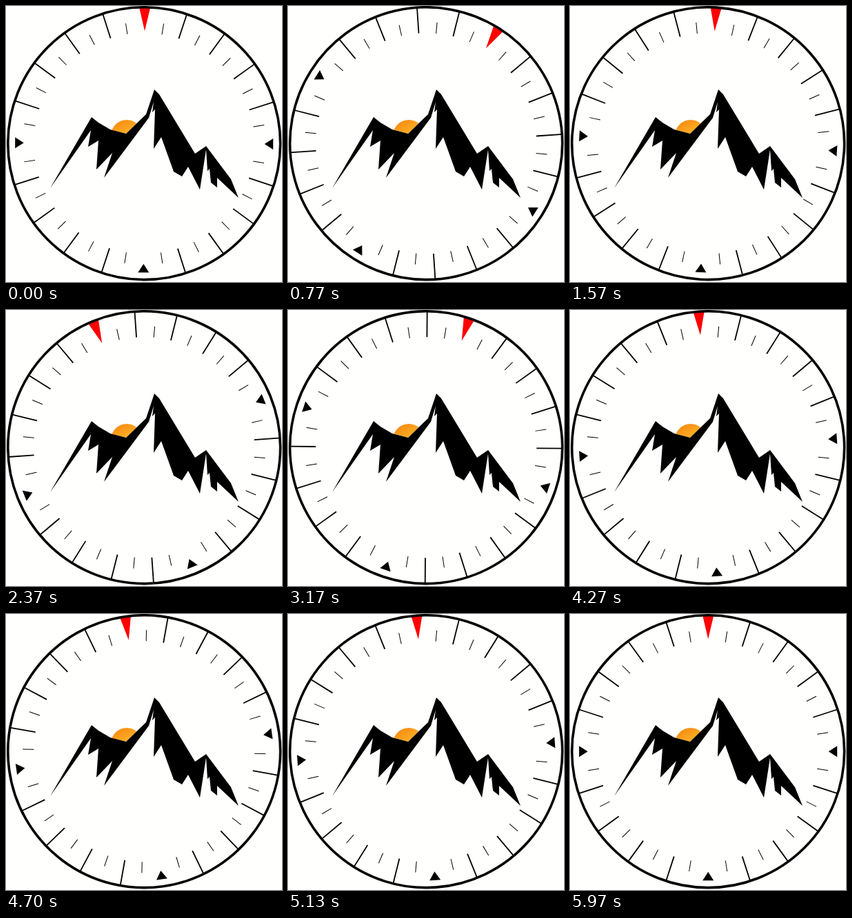
An HTML page with a canvas for the animation above (6.01 s loop, 400 by 400 pixels).

```html
<!DOCTYPE html>
<html lang="en">
<head>
<meta charset="utf-8">
<title>Mountain compass</title>
<style>
html, body { margin: 0; width: 100%; height: 100%; overflow: hidden; background: #fffffd; }
canvas { display: block; width: 400px; height: 400px; }
</style>
</head>
<body>
<canvas id="stage" width="400" height="400"></canvas>
<script>
const ctx = document.getElementById('stage').getContext('2d');
const LOOP = 6010, SWING = 6000, STEP = 100 / 3, LAST = 179;
const INK = '#000', PAPER = '#fffffd';

// Evenly spaced turning points of the needle, in degrees
const swings = [0, 35, -22, 22, -8, 0];

// Key points: the skyline from left to right, then the shaded side back again
const skyline = [
  [64, 264], [124, 161], [134, 169], [151, 179], [174, 185], [203, 157],
  [215, 121], [222, 128], [274, 214], [290, 203], [326, 251], [337, 278]
];
const shade = [
  [306, 249], [306, 263], [297, 256], [295, 236], [292, 239], [290, 208],
  [281, 266], [264, 233], [255, 247], [243, 240], [225, 190], [214, 207],
  [216, 150], [212, 154], [214, 139], [207, 162], [142, 249], [154, 213],
  [131, 237], [134, 195], [119, 204], [123, 180]
];

// cubic-bezier(.25, .1, .25, 1)
function ease(x) {
  let lo = 0, hi = 1;
  for (let i = 0; i < 24; i++) {
    const s = (lo + hi) / 2;
    if (0.75 * s * (1 - s) + s * s * s < x) lo = s; else hi = s;
  }
  const s = (lo + hi) / 2, r = 1 - s;
  return 0.3 * r * r * s + 3 * r * s * s + s * s * s;
}

function angleAt(ms) {
  const n = Math.min(LAST, Math.floor((ms + 5) / STEP));
  const p = Math.min((n * STEP + 20) / SWING, 0.9999) * (swings.length - 1);
  const i = Math.floor(p);
  return swings[i] + (swings[i + 1] - swings[i]) * ease(p - i);
}

function trace(points) {
  ctx.beginPath();
  points.forEach(([x, y]) => ctx.lineTo(x, y));
  ctx.closePath();
}

function poly(points, fill) {
  trace(points);
  ctx.fillStyle = fill;
  ctx.fill();
}

function spun(deg, draw) {
  ctx.save();
  ctx.rotate(deg * Math.PI / 180);
  draw();
  ctx.restore();
}

function tick(from, to, width) {
  ctx.lineWidth = width;
  ctx.beginPath();
  ctx.moveTo(0, -from);
  ctx.lineTo(0, -to);
  ctx.stroke();
}

function mark(base, tip, fill) {
  poly([[-8, -base], [8, -base], [0, -tip]], fill);
}

function dial() {
  ctx.strokeStyle = INK;
  for (let k = 0; k < 40; k++) {
    spun(k * 9, () => {
      if (k === 0) mark(197, 163, '#f00');
      else if (k % 10 === 0) mark(187, 174.5, INK);
      else if (k % 2) tick(160, 176, 1);
      else tick(160, 198, 1.8);
    });
  }
  ctx.lineWidth = 3.6;
  ctx.beginPath();
  ctx.arc(0, 0, 197.4, 0, Math.PI * 2);
  ctx.stroke();
}

function sun() {
  const glow = ctx.createLinearGradient(166, 164, 178, 187);
  glow.addColorStop(0, '#f68a10');
  glow.addColorStop(1, '#ffb52a');
  ctx.save();
  trace([...skyline.slice(1, 7), [124, 121]]);
  ctx.clip();
  ctx.beginPath();
  ctx.arc(175, 188, 23, 0, Math.PI * 2);
  ctx.fillStyle = glow;
  ctx.fill();
  ctx.restore();
}

let start = null;
function frame(now) {
  if (start === null) start = now;
  ctx.fillStyle = PAPER;
  ctx.fillRect(0, 0, 400, 400);
  ctx.save();
  ctx.translate(200.2, 199.2);
  spun(angleAt((now - start) % LOOP), dial);
  ctx.restore();
  sun();
  poly([...skyline, ...shade], INK);
  requestAnimationFrame(frame);
}
requestAnimationFrame(frame);
</script>
</body>
</html>
```
